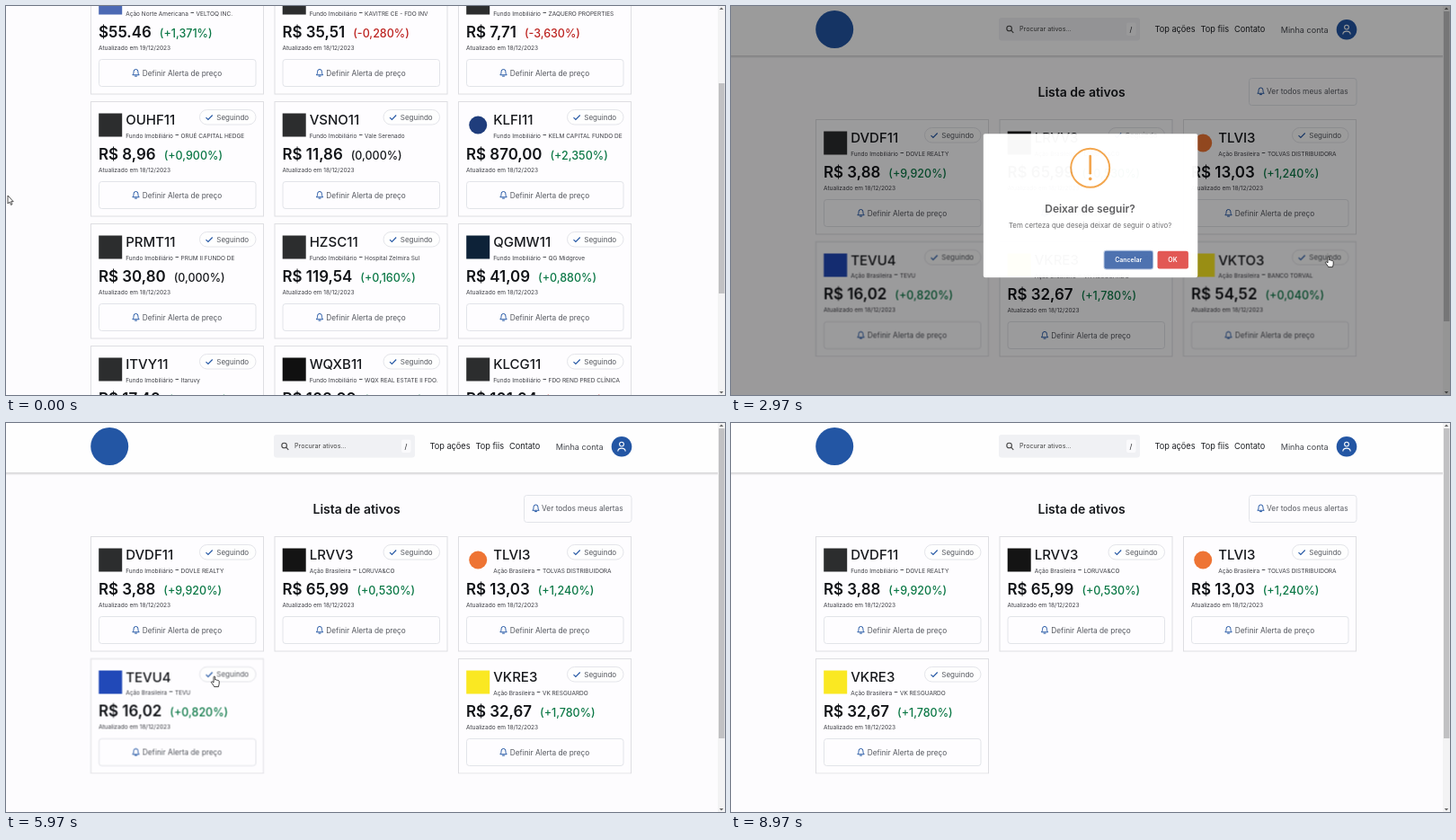
An HTML page for the animation above (9000 ms loop, 800 by 433 pixels).

```html
<!DOCTYPE html>
<html lang="pt-BR">
<head>
<meta charset="utf-8">
<title>Lista de ativos</title>
<style>
html, body { margin: 0; width: 100%; height: 100%; overflow: hidden; background: #fdfcfe; }
svg { display: block; width: 100vw; height: 100vh; font-family: Inter, Roboto, sans-serif; }
.loop { animation: 9s linear infinite; }
.step { animation: 9s step-end infinite; }

/* page scroll and change of list */
.page { animation-name: scroll; }
.thumb { animation-name: thumb; }
.first { animation-name: first; }
.second { animation-name: second; }
.loading { animation-name: loading; }
.spin { animation: spin .45s -.08s linear infinite; transform-origin: 788.2px 8.5px; }
@keyframes scroll {
  0%, .6% { transform: translateY(-156px); }
  10% { transform: translateY(-110px); }
  13.4%, 20.99% { transform: translateY(-58px); }
  21%, 100% { transform: none; }
}
@keyframes thumb {
  0%, .6% { transform: translateY(86px); }
  10% { transform: translateY(62px); }
  13.4%, 100% { transform: translateY(36px); }
}
@keyframes first { 0% { opacity: 1; } 21%, 100% { opacity: 0; } }
@keyframes second { 0% { opacity: 0; } 21%, 100% { opacity: 1; } }
@keyframes loading { 0% { opacity: 0; } 12% { opacity: 1; } 21%, 100% { opacity: 0; } }
@keyframes spin { to { transform: rotate(360deg); } }

/* unfollowed cards leave, the remaining one moves over */
.bank { animation-name: bank; }
.plane { animation-name: plane; }
.mover { animation-name: mover; }
.bank .off { animation-name: bankOff; }
.plane .off { animation-name: planeOff; }
@keyframes bank { 0% { opacity: 1; } 59.5%, 100% { opacity: 0; } }
@keyframes plane { 0% { opacity: 1; } 77.5%, 100% { opacity: 0; } }
@keyframes mover {
  0% { transform: none; }
  59.5% { transform: translateX(204.5px); }
  77.5%, 100% { transform: translateX(-204.5px); }
}
@keyframes bankOff { 0% { opacity: 0; } 57.5%, 100% { opacity: 1; } }
@keyframes planeOff { 0% { opacity: 0; } 71.8%, 100% { opacity: 1; } }

/* dialog */
.overlay { animation-name: overlay; animation-timing-function: ease; }
.modal { animation-name: pop; animation-timing-function: ease; transform-origin: 400px 222px; }
.icon { animation: pulse .75s linear infinite alternate; }
@keyframes overlay {
  0%, 30.33% { opacity: 0; }
  33.67%, 42.78% { opacity: 1; }
  46.11%, 47.22% { opacity: 0; }
  50.56%, 61.78% { opacity: 1; }
  65.11%, 66.67% { opacity: 0; }
  70%, 73.33% { opacity: 1; }
  76.67%, 100% { opacity: 0; }
}
@keyframes pop {
  0%, 30.33%, 47.22%, 66.67% { transform: scale(.5); }
  31.83%, 48.72%, 68.17% { transform: scale(1.05); }
  33%, 49.89%, 69.33% { transform: scale(.955); }
  33.67%, 46.2%, 50.56%, 65.2%, 70%, 100% { transform: none; }
}
@keyframes pulse { from { color: #f3a246; } to { color: #f7d08f; } }

/* pointer */
.pointer { animation-name: move; animation-timing-function: ease-in-out; }
.arrow { animation-name: arrow; }
.hand { animation-name: hand; }
@keyframes move {
  0%, .4% { transform: translate(2px, 211px); }
  10% { transform: translate(290px, 300px); }
  13.5%, 21% { transform: translate(340px, 291px); }
  29%, 33.4% { transform: translate(665px, 279px); }
  38%, 42.6% { transform: translate(442px, 283px); }
  45.7%, 48% { transform: translate(659px, 278px); }
  54%, 61.5% { transform: translate(492px, 284px); }
  65.4%, 67% { transform: translate(232px, 282px); }
  71.4%, 74% { transform: translate(501px, 288px); }
  82% { transform: translate(430px, 310px); }
  91.5%, 100% { transform: translate(13px, 215px); }
}
@keyframes arrow {
  0% { opacity: 1; }
  28.5% { opacity: 0; }
  33.6% { opacity: 1; }
  64.8% { opacity: 0; }
  67.5% { opacity: 1; }
  91.5%, 100% { opacity: 0; }
}
@keyframes hand {
  0% { opacity: 0; }
  28.5% { opacity: 1; }
  33.6% { opacity: 0; }
  64.8% { opacity: 1; }
  67.5%, 100% { opacity: 0; }
}
</style>
</head>
<body>
<svg viewBox="0 0 800 433">
  <defs>
    <linearGradient id="shade" x2="0" y2="1">
      <stop stop-color="#000" stop-opacity=".17"/>
      <stop offset="1" stop-color="#000" stop-opacity="0"/>
    </linearGradient>
    <g id="bell" fill="none" stroke="#2356a4" stroke-linejoin="round" stroke-linecap="round">
      <path d="M-3.4 2C-2.2 .8-2.6-.6-2.4-1.6A2.4 2.4 0 0 1 2.4-1.6C2.6-.6 2.2.8 3.4 2ZM-1 3.6H1"/>
    </g>
  </defs>
  <rect width="800" height="433" fill="#fdfcfe"/>

  <g class="loop page">
    <rect width="793" height="55" fill="#fefefe"/>
    <rect y="55" width="793" height="3.5" fill="url(#shade)"/>
    <circle cx="115.2" cy="26" r="21" fill="#2356a4"/>
    <rect x="298" y="13" width="157" height="25.5" rx="3" fill="#f0f1f4"/>
    <g fill="none" stroke="#444" stroke-width="1.1"><circle cx="309.6" cy="25" r="2.8"/><path d="M311.7 27.2l2.6 2.6"/></g>
    <rect x="440" y="18.5" width="10.5" height="14.5" rx="2" fill="#fafafc"/>
    <g fill="#1d1f23" font-size="9.2">
      <text x="321" y="28" font-size="7.2" fill="#444">Procurar ativos...</text>
      <text x="443.6" y="28.6" font-size="8">/</text>
      <text x="471.5" y="29.3">Top ações</text>
      <text x="522.5" y="29.3">Top fiis</text>
      <text x="560" y="29.3">Contato</text>
      <text x="611.7" y="29.5" font-size="9.1" fill="#44474d">Minha conta</text>
    </g>
    <circle cx="685" cy="26.3" r="11.3" fill="#2356a4"/>
    <g fill="none" stroke="#fff" stroke-width="1.1"><circle cx="685" cy="23.6" r="2.4"/><path d="M680.8 31.4C681 27 689 27 689.2 31.4"/></g>
    <text x="341.5" y="100.5" font-size="14" font-weight="600" fill="#17191d">Lista de ativos</text>
    <rect x="576.5" y="80.5" width="119.5" height="30" rx="3" fill="none" stroke="#e2e4e9"/>
    <use href="#bell" x="589.5" y="95"/>
    <text x="596" y="98.4" font-size="8.33" fill="#55585f">Ver todos meus alertas</text>
    <g class="step first" id="first"></g>
    <g class="step second" id="second"></g>
  </g>

  <g class="step loading">
    <ellipse cx="738" cy="-.6" rx="36" ry="2" fill="#6f92cf" opacity=".45"/>
  </g>
  <rect x="792" width="8" height="433" fill="#f3f3f4"/>
  <path d="M793.8 4L796 1.4 798.2 4Z" fill="#666"/>
  <path d="M793.8 429L796 431.6 798.2 429Z" fill="#666"/>
  <g class="step first"><rect class="loop thumb" x="793" width="6.5" height="234" fill="#c1c1c3"/></g>
  <rect class="step second" x="793" y="6" width="6.5" height="345" fill="#c1c1c3"/>
  <g class="step loading">
    <path class="spin" d="M785 11.7A4.5 4.5 0 0 1 791.4 5.3" fill="none" stroke="#3d68b0" stroke-width="1.3"/>
  </g>

  <g class="loop overlay">
    <rect width="800" height="433" opacity=".4"/>
    <g class="loop modal">
      <rect x="275" y="138.5" width="250" height="167.5" rx="2.5" fill="#fff"/>
      <g class="icon" fill="currentColor">
        <circle cx="399.7" cy="178.3" r="22.5" fill="none" stroke="currentColor" stroke-width="2"/>
        <rect x="398.3" y="163" width="2.8" height="23" rx="1.4"/>
        <circle cx="399.7" cy="191" r="1.9"/>
      </g>
      <g text-anchor="middle">
        <text x="399.5" y="230.6" font-size="12.5" font-weight="600" fill="#5b5b5d">Deixar de seguir?</text>
        <text x="399.5" y="248.6" font-size="8.2" fill="#6c6c6e">Tem certeza que deseja deixar de seguir o ativo?</text>
        <rect x="415.2" y="274" width="58.2" height="22.8" rx="3" fill="#b9c8e2"/>
        <rect x="416.2" y="275" width="56.2" height="20.8" rx="2.4" fill="#4a6fae"/>
        <rect x="478" y="275" width="36" height="20.8" rx="2.4" fill="#e25450"/>
        <g font-size="7.3" font-weight="600" fill="#fff">
          <text x="444.2" y="288">Cancelar</text>
          <text x="495.7" y="288">OK</text>
        </g>
      </g>
    </g>
  </g>

  <g class="loop pointer">
    <path class="step arrow" d="M0 0V9L2 7.2 3.5 10.4 4.9 9.8 3.5 6.7H6.2Z" fill="#fff" stroke="#222" stroke-width=".8"/>
    <g class="step hand">
      <path d="M-1 .8C-1-.3.7-.3.7.8V4C1.2 3.4 2.2 3.6 2.3 4.3 2.9 3.8 3.7 4.1 3.8 4.8 4.6 4.4 5.2 4.9 5.2 5.7V8.2C5.2 9.5 4.5 10 4.4 11.6H-.4C-.6 10.2-3.4 7.6-3.6 6.6-3.6 5.5-2.2 5.6-1 7Z" fill="#fff" stroke="#222" stroke-width=".85"/>
    </g>
  </g>
</svg>

<script>
const KIND = { f: 'Fundo Imobiliário', b: 'Ação Brasileira', a: 'Ação Norte Americana' };
const DARK = '#2c2d2e', YELLOW = '#fae822';

// code, kind, name, price, change, tile colour, extra: round tile or class
const FIRST = [
  ['QVLT', 'a', 'VELTOQ INC.', '$55.46', '+1,371', '#4c69b4'],
  ['KVTR11', 'f', 'KAVITRE CE - FDO INV', 'R$ 35,51', '-0,280', DARK],
  ['ZQRO11', 'f', 'ZAQUERO PROPERTIES', 'R$ 7,71', '-3,630', DARK],
  ['OUHF11', 'f', 'ORUÉ CAPITAL HEDGE', 'R$ 8,96', '+0,900', DARK],
  ['VSNO11', 'f', 'Vale Serenado', 'R$ 11,86', '0,000', DARK],
  ['KLFI11', 'f', 'KELM CAPITAL FUNDO DE', 'R$ 870,00', '+2,350', '#1f3d7c', 'round'],
  ['PRMT11', 'f', 'PRUM II FUNDO DE', 'R$ 30,80', '0,000', DARK],
  ['HZSC11', 'f', 'Hospital Zelmira Sul', 'R$ 119,54', '+0,160', DARK],
  ['QGMW11', 'f', 'QG Midgrove', 'R$ 41,09', '+0,880', '#0d2238'],
  ['ITVY11', 'f', 'Itaruvy', 'R$ 17,40', '+0,680', DARK],
  ['WQXB11', 'f', 'WQX REAL ESTATE II FDO.', 'R$ 102,99', '+0,880', '#101010'],
  ['KLCG11', 'f', 'FDO REND PRED CLÍNICA', 'R$ 101,04', '-0,460', DARK],
];
const SECOND = [
  ['DVDF11', 'f', 'DOVLE REALTY', 'R$ 3,88', '+9,920', DARK],
  ['LRVV3', 'b', 'LORUVA&amp;CO', 'R$ 65,99', '+0,530', '#141414'],
  ['TLVI3', 'b', 'TOLVAS DISTRIBUIDORA', 'R$ 13,03', '+1,240', '#ee7434', 'round'],
  ['TEVU4', 'b', 'TEVU', 'R$ 16,02', '+0,820', '#2149b8', 'plane'],
  ['VKRE3', 'b', 'VK RESGUARDO', 'R$ 32,67', '+1,780', YELLOW, 'mover'],
  ['VKTO3', 'b', 'BANCO TORVAL', 'R$ 54,52', '+0,040', YELLOW, 'bank'],
];

const text = (x, y, size, fill, body, more = '') =>
  `<text x="${x}" y="${y}" font-size="${size}" fill="${fill}" ${more}>${body}</text>`;

const tint = change => ({ '+': '#0b7846', '-': '#bd2320' }[change[0]] || '#17191d');

const tile = (color, round) => round
  ? `<circle cx="21.7" cy="26" r="10" fill="${color}"/>`
  : `<rect x="8.7" y="13" width="26" height="26" fill="${color}"/>`;

const pill = (fill, stroke) =>
  `<rect x="121" y="9" width="62.5" height="16.5" rx="8.2" fill="${fill}" stroke="${stroke}"/>`;

const badge = canLeave =>
  pill('#fefefe', '#e4e5ea') +
  '<path d="M128 17.6l2.4 2.4 4.8-5" fill="none" stroke="#2356a4" stroke-width="1.1"/>' +
  text(139.8, 20.2, 8, '#55585f', 'Seguindo') +
  (canLeave ? `<g class="step off">${pill('#2356a4', '#2356a4')}
    <path d="M134.5 17.3h6M137.5 14.3v6" stroke="#fff"/>${text(144.8, 20.2, 8, '#fff', 'Seguir')}</g>` : '');

function card([code, kind, name, price, change, color, extra = ''], i) {
  const x = 94.5 + i % 3 * 204.5, y = 126.5 + Math.floor(i / 3) * 136;
  const round = extra === 'round';
  return `<g transform="translate(${x} ${y})"><g class="${extra && !round ? 'step ' + extra : ''}">
    <rect width="192" height="127.5" fill="#fefdff" stroke="#dedee2"/>
    ${tile(color, round)}${badge(extra === 'bank' || extra === 'plane')}
    ${text(38.7, 25.5, 15, '#17191d', code, 'font-weight="500"')}
    ${text(38.7, 40.1, 6.5, '#3c3e44', `${KIND[kind]} <tspan font-size="11">-</tspan> ${name}`)}
    ${text(8.6, 64.4, 16.9, '#111317', `${price}<tspan dx="9" font-size="12.5" font-weight="500"
      fill="${tint(change)}">(${change}%)</tspan>`, 'font-weight="600"')}
    ${text(8.6, 78.4, 6.55, '#3c3e44', `Atualizado em ${kind === 'a' ? 19 : 18}/12/2023`)}
    <rect x="9" y="89" width="174.5" height="30" rx="3" fill="none" stroke="#e2e4e9"/>
    <use href="#bell" x="50" y="104"/>
    ${text(57.3, 107.4, 8.28, '#55585f', 'Definir Alerta de preço')}
  </g></g>`;
}

document.getElementById('first').innerHTML = FIRST.map(card).join('');
document.getElementById('second').innerHTML = SECOND.map(card).join('');
</script>
</body>
</html>
```
